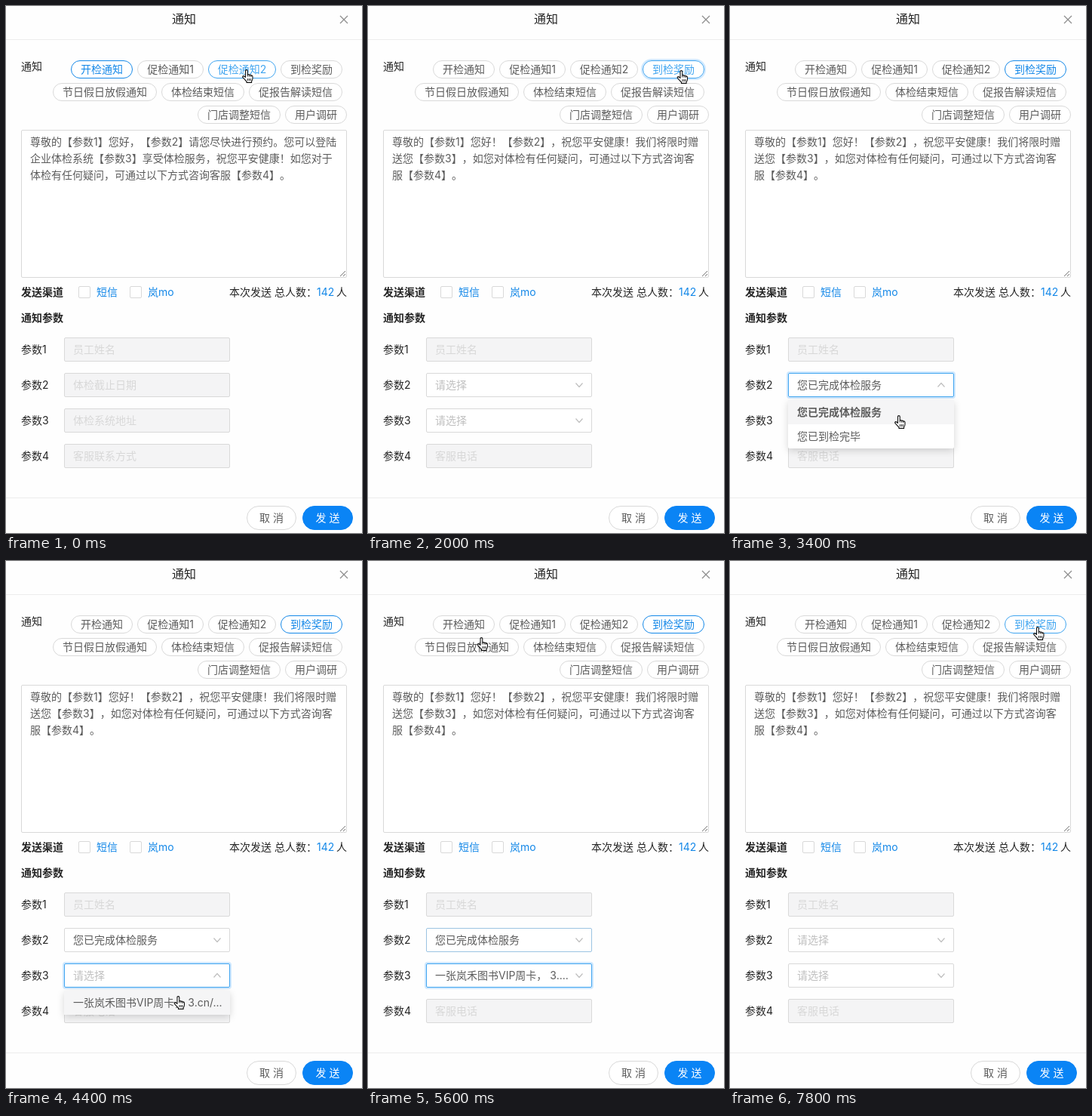
Recreate the animation shown at these times as an HTML page. Size 472 by 698 pixels, loop 8 s.

```html
<!DOCTYPE html>
<html lang="zh-CN">
<head>
<meta charset="utf-8">
<title>通知</title>
<style>
  html, body { margin: 0; width: 100%; height: 100%; overflow: hidden; background: #fefefe; }
  svg { display: block; width: 472px; height: 698px; }
  text {
    font-family: Inter, "Noto Sans CJK SC", "Noto Sans CJK", sans-serif;
    font-size: 14px;
    text-spacing-trim: space-all;
  }
</style>
</head>
<body>
<svg id="stage" viewBox="0 0 472 698" xmlns="http://www.w3.org/2000/svg"></svg>
<script>
const LOOP = 8000, STEP = 200;
const BLUE = [20, 136, 232], HOVER = [64, 165, 240];
const INK = '#262626', BODY = '#5c5c5c', LINE = '#d9d9d9', FAINT = '#bfbfbf', OFF = '#d8d8d8';
const stage = document.getElementById('stage');

const PILLS = [
  ['开检通知', 86, 72, 82], ['促检通知1', 174, 72, 88],
  ['促检通知2', 268, 72, 90], ['到检奖励', 364, 72, 82],
  ['节日假日放假通知', 62, 102, 138], ['体检结束短信', 206, 102, 110],
  ['促报告解读短信', 322, 102, 124],
  ['门店调整短信', 254, 132, 110], ['用户调研', 370, 132, 82]
].map(([label, x, y, w]) => ({ label, x, y, w, h: 24 }));
const FIELDS = [439, 486, 533, 580].map(y => ({ x: 77, y, w: 220, h: 32 }));
const AREA = { x: 20, y: 164, w: 432, h: 196 };

const REMIND = [
  '尊敬的【参数1】您好，【参数2】请您尽快进行预约。您可以登陆',
  '企业体检系统【参数3】享受体检服务，祝您平安健康！如您对于',
  '体检有任何疑问，可通过以下方式咨询客服【参数4】。'
];
const REWARD = [
  '尊敬的【参数1】您好！【参数2】，祝您平安健康！我们将限时赠',
  '送您【参数3】，如您对体检有任何疑问，可通过以下方式咨询客',
  '服【参数4】。'
];
const DONE = '您已完成体检服务';
const CARD = '一张岚禾图书VIP周卡， 3';

// time, x, y of the pointer tip
const PATH = [
  [0, 319, 85], [1000, 319, 86], [1600, 415.5, 86], [2000, 415.5, 86],
  [2400, 330, 300], [2700, 232, 503], [3000, 228, 506], [3200, 224, 543],
  [3600, 224, 543], [4100, 228, 550], [4300, 228.5, 577], [4800, 228.5, 577],
  [5200, 215, 545], [5400, 195, 505], [5600, 150.5, 102], [6000, 230, 85],
  [6400, 306.5, 88], [7000, 306.5, 88], [7300, 408, 88], [8000, 408, 88]
];

function pointer(t) {
  t = Math.max(0, t);
  const i = Math.max(1, PATH.findIndex(k => k[0] >= t));
  const [t0, x0, y0] = PATH[i - 1], [t1, x1, y1] = PATH[i];
  const p = (t - t0) / (t1 - t0);
  return [x0 + (x1 - x0) * p, y0 + (y1 - y0) * p];
}

const inside = ([x, y], b) => x >= b.x && x <= b.x + b.w && y >= b.y && y <= b.y + b.h;
const between = (t, a, b) => t >= a && t < b;

// Share of the last 300 ms that the pointer spent over a box
function hover(t, box) {
  let n = 0;
  for (let i = 1; i <= 5; i++) n += inside(pointer(t - i * 50), box);
  return n / 5;
}

const rgb = c => `rgb(${c.map(Math.round)})`;
const mix = (a, b, p) => a.map((v, i) => v + (b[i] - v) * p);
const text = (s, x, y, fill = BODY, more = '') => `<text x="${x}" y="${y}" fill="${fill}" ${more}>${s}</text>`;
const path = (d, stroke, more = '') => `<path d="${d}" fill="none" stroke="${stroke}" ${more}/>`;
const box = (b, r, fill, stroke, more = '') =>
  `<rect x="${b.x + .5}" y="${b.y + .5}" width="${b.w - 1}" height="${b.h - 1}" rx="${r}" fill="${fill}" stroke="${stroke}" ${more}/>`;
const ring = (b, r) =>
  `<rect x="${b.x - 1}" y="${b.y - 1}" width="${b.w + 2}" height="${b.h + 2}" rx="${r}" fill="none" stroke="#1890ff" stroke-opacity=".2" stroke-width="2"/>`;
const MID = 'text-anchor="middle"', BOLD = 'font-weight="600"';

function frame() {
  const check = x => box({ x, y: 371, w: 16, h: 16 }, 1.5, '#fff', LINE);
  const cancel = { x: 319, y: 662, w: 66, h: 32 }, send = { x: 393, y: 662, w: 67, h: 32 };
  return `<defs><filter id="drop" x="-20%" y="-30%" width="140%" height="170%">
    <feDropShadow dx="0" dy="3" stdDeviation="5" flood-opacity=".16"/></filter></defs>
    <rect width="472" height="698" fill="#fefefe"/>` +
    text('通知', 236, 23, INK, `${MID} font-weight="500" style="font-size:16px"`) +
    path('M443 13L453 23M453 13L443 23', '#8f8f8f', 'stroke-width="1.3"') +
    path('M0 44.5H472M0 651.5H472', '#ececec') +
    text('通知', 20, 85, INK) +
    box(AREA, 1.5, '#fff', LINE) +
    path('M443 358L450 351M447 358L450 355', '#777') +
    text('发送渠道', 20, 384, INK, BOLD) + check(96) + check(164) +
    text('短信', 120, 384, rgb(BLUE)) + text('岚mo', 188, 384, rgb(BLUE)) +
    text('本次发送 总人数：', 296, 384, INK) + text('142', 412, 384, rgb(BLUE)) +
    text('人', 438, 384, INK) +
    text('通知参数', 20, 418, INK, BOLD) +
    FIELDS.map((f, i) => text('参数' + (i + 1), 20, f.y + 21, INK)).join('') +
    box(cancel, 15.5, '#fff', LINE) + text('取 消', 352, 683, BODY, MID) +
    box(send, 15.5, '#0a84f5', '#0a84f5') + text('发 送', 426.5, 683, '#fff', MID);
}

function pill(p, t, on, pulse) {
  const h = hover(t, p);
  const ink = rgb(mix(on ? BLUE : [92, 92, 92], HOVER, h));
  const edge = rgb(mix(on ? BLUE : [217, 217, 217], HOVER, h));
  return (pulse ? ring(p, 13) : '') + box(p, 11.5, '#fff', edge) +
    text(p.label, p.x + p.w / 2, p.y + 17, ink, MID);
}

const disabled = (f, s) => box(f, 1.5, '#f4f4f5', LINE) + text(s, 89, f.y + 21, OFF);

function select(f, t, value, focus, open) {
  const edge = focus ? HOVER : mix([217, 217, 217], HOVER, hover(t, f));
  const y = f.y + 16, d = open ? -2.5 : 2.5;
  return (focus ? ring(f, 3) : '') + box(f, 1.5, '#fff', rgb(edge)) +
    text(value || '请选择', 89, f.y + 21, value ? BODY : FAINT) +
    path(`M275.5 ${y - d}L280 ${y + d}L284.5 ${y - d}`, FAINT, 'stroke-width="1.2"');
}

function menu(y, items, bold) {
  return `<rect x="77" y="${y}" width="220" height="${items.length * 32}" rx="2" fill="#fff" filter="url(#drop)"/>
    <rect x="77" y="${y}" width="220" height="32" fill="#f5f5f6"/>` +
    items.map((s, i) => text(s, 89, y + 21 + i * 32, BODY, bold && !i ? BOLD : '')).join('');
}

function cursor(at, hand) {
  const [x, y] = at;
  if (hand) return `<g transform="translate(${x - 6} ${y - 1})" stroke="#111" stroke-width="1.1" stroke-linejoin="round">
    <path fill="#fff" d="M4.5 10.5V2Q4.5 .6 5.9 .6T7.3 2V7Q8.6 6.2 9.6 7.3Q11 6.8 11.8 8Q13.6 7.6 14 9.2V12Q14 14 12.6 15.6V17.4H6V16Q3.5 13.5 .8 10.4Q.3 8.8 1.8 8.6Q3 8.7 4.5 10.5Z"/>
    <path fill="none" stroke-width=".9" d="M7.3 7V9.5M9.6 7.3V9.7M11.8 8V10M7.5 12V15M9.5 12V15M11.4 12V15"/></g>`;
  if (inside(at, AREA)) return path(`M${x - 3} ${y - 8}Q${x} ${y - 8} ${x} ${y - 5}V${y + 5}Q${x} ${y + 8} ${x - 3} ${y + 8}M${x + 3} ${y - 8}Q${x} ${y - 8} ${x} ${y - 5}M${x} ${y + 5}Q${x} ${y + 8} ${x + 3} ${y + 8}`, '#222');
  return `<path transform="translate(${x} ${y})" d="M0 0V15L3.5 11.8L5.8 17L8 16L5.8 11H10.5Z" fill="#111" stroke="#fff"/>`;
}

function render(t) {
  const reward = between(t, 1800, 6600) || t >= 7400;
  const late = between(t, 6600, 6800);
  const chosen = t < 400 ? 0 : t < 1800 ? 2 : t < 6800 ? 3 : t < 7400 ? 2 : 3;
  const pulse = between(t, 400, 600) || late ? 2 : between(t, 1800, 2200) || between(t, 7400, 7600) ? 3 : -1;
  const open2 = between(t, 2800, 3600), open3 = between(t, 4200, 4800);
  const value2 = between(t, 3400, 6600) ? DONE : '';
  const value3 = between(t, 4800, 6600) ? CARD + '....' : '';
  const [f1, f2, f3, f4] = FIELDS;

  let out = frame() + PILLS.map((p, i) => pill(p, t, i === chosen, i === pulse)).join('') +
    (reward ? REWARD : REMIND).map((s, i) => text(s, 32, 185 + i * 22)).join('') +
    disabled(f1, '员工姓名') +
    (reward || late ? select(f2, t, value2, between(t, 2800, 4000), open2) : disabled(f2, '体检截止日期')) +
    (reward ? select(f3, t, value3, between(t, 4000, 6600), open3) : disabled(f3, '体检系统地址')) +
    disabled(f4, reward ? '客服电话' : '客服联系方式');
  if (open2) out += menu(522, [DONE, '您已到检完毕'], t >= 3400);
  if (open3) out += menu(569, [CARD + '.cn/...']);

  const at = pointer(t);
  const hand = open2 || open3 || PILLS.some(p => inside(at, p)) || (reward && (inside(at, f2) || inside(at, f3)));
  stage.innerHTML = out + cursor(at, hand);
}

let last = -1;
function tick(now) {
  const t = Math.floor(now % LOOP / STEP) * STEP;
  if (t !== last) render(last = t);
  requestAnimationFrame(tick);
}
render(0);
requestAnimationFrame(tick);
</script>
</body>
</html>
```
